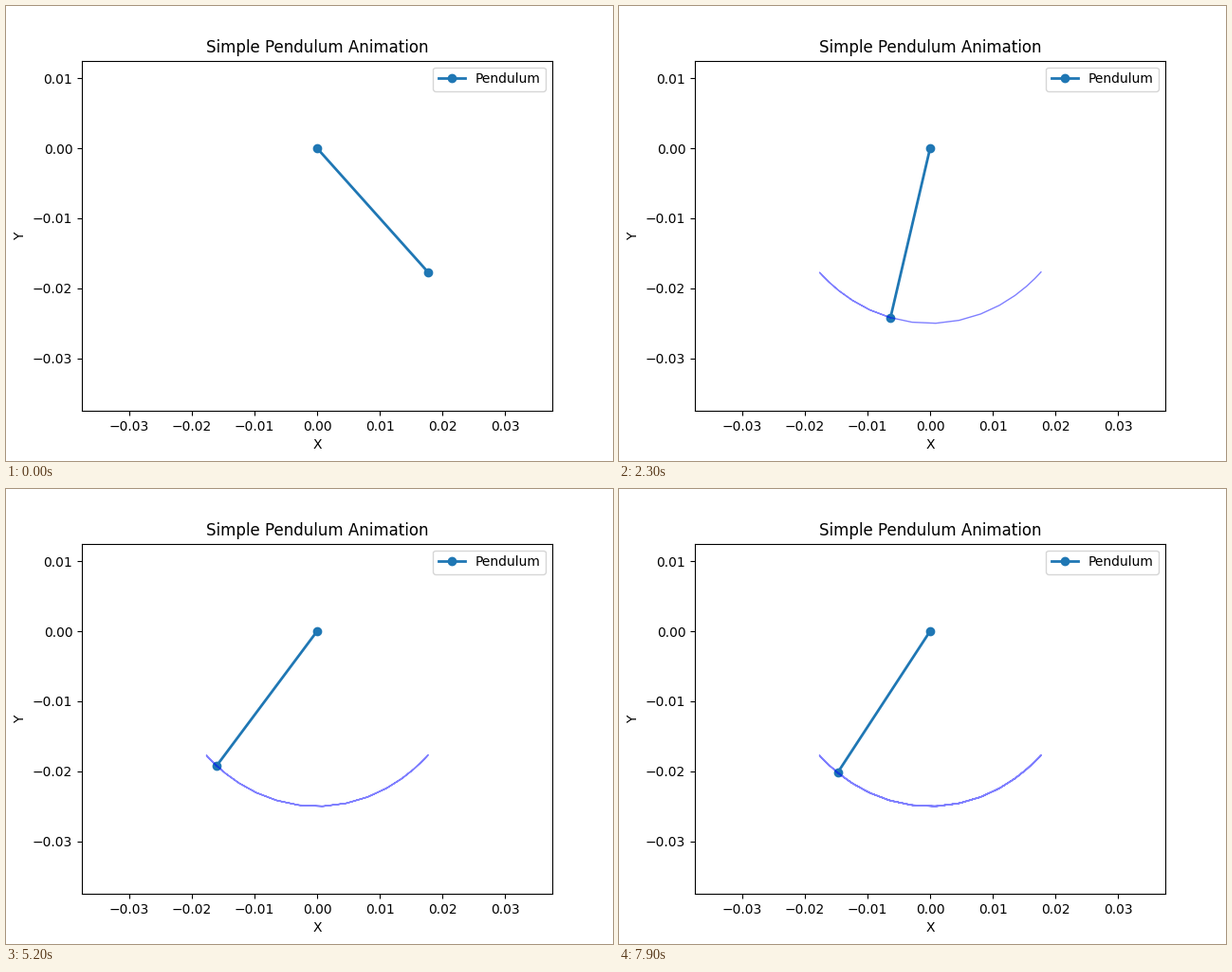
A matplotlib script for the animation above (8000 ms loop, 640 by 480 pixels).

```python
import numpy as np
import matplotlib.pyplot as plt
from matplotlib.animation import FuncAnimation

G = 9.81
LENGTH = 0.025
START = np.pi / 4
FRAMES = 80
INTERVAL = 100  # ms
STEP = 10 / 999  # simulated seconds per frame
SUBSTEPS = 20


def slope(state):
    theta, omega = state
    return np.array([omega, -G / LENGTH * np.sin(theta)])


def rk4(state, h):
    k1 = slope(state)
    k2 = slope(state + h / 2 * k1)
    k3 = slope(state + h / 2 * k2)
    k4 = slope(state + h * k3)
    return state + h / 6 * (k1 + 2 * k2 + 2 * k3 + k4)


def swing():
    """Angle of the pendulum at every frame."""
    state = np.array([START, 0.0])
    angles = [START]
    for _ in range(FRAMES - 1):
        for _ in range(SUBSTEPS):
            state = rk4(state, STEP / SUBSTEPS)
        angles.append(state[0])
    return np.array(angles)


theta = swing()
x = LENGTH * np.sin(theta)
y = -LENGTH * np.cos(theta)

fig, ax = plt.subplots(figsize=(6.4, 4.8), dpi=100)
ax.set_xlim(-1.5 * LENGTH, 1.5 * LENGTH)
ax.set_ylim(-1.5 * LENGTH, 0.5 * LENGTH)
ax.set_title("Simple Pendulum Animation")
ax.set_xlabel("X")
ax.set_ylabel("Y")

rod, = ax.plot([], [], "o-", lw=2, label="Pendulum")
trail, = ax.plot([], [], "b-", lw=1, alpha=0.5)
ax.legend(loc="upper right")


def update(i):
    rod.set_data([0, x[i]], [0, y[i]])
    trail.set_data(x[:i + 1], y[:i + 1])
    return rod, trail


anim = FuncAnimation(fig, update, frames=FRAMES, interval=INTERVAL,
                     repeat=True, repeat_delay=0)
plt.show()
```
